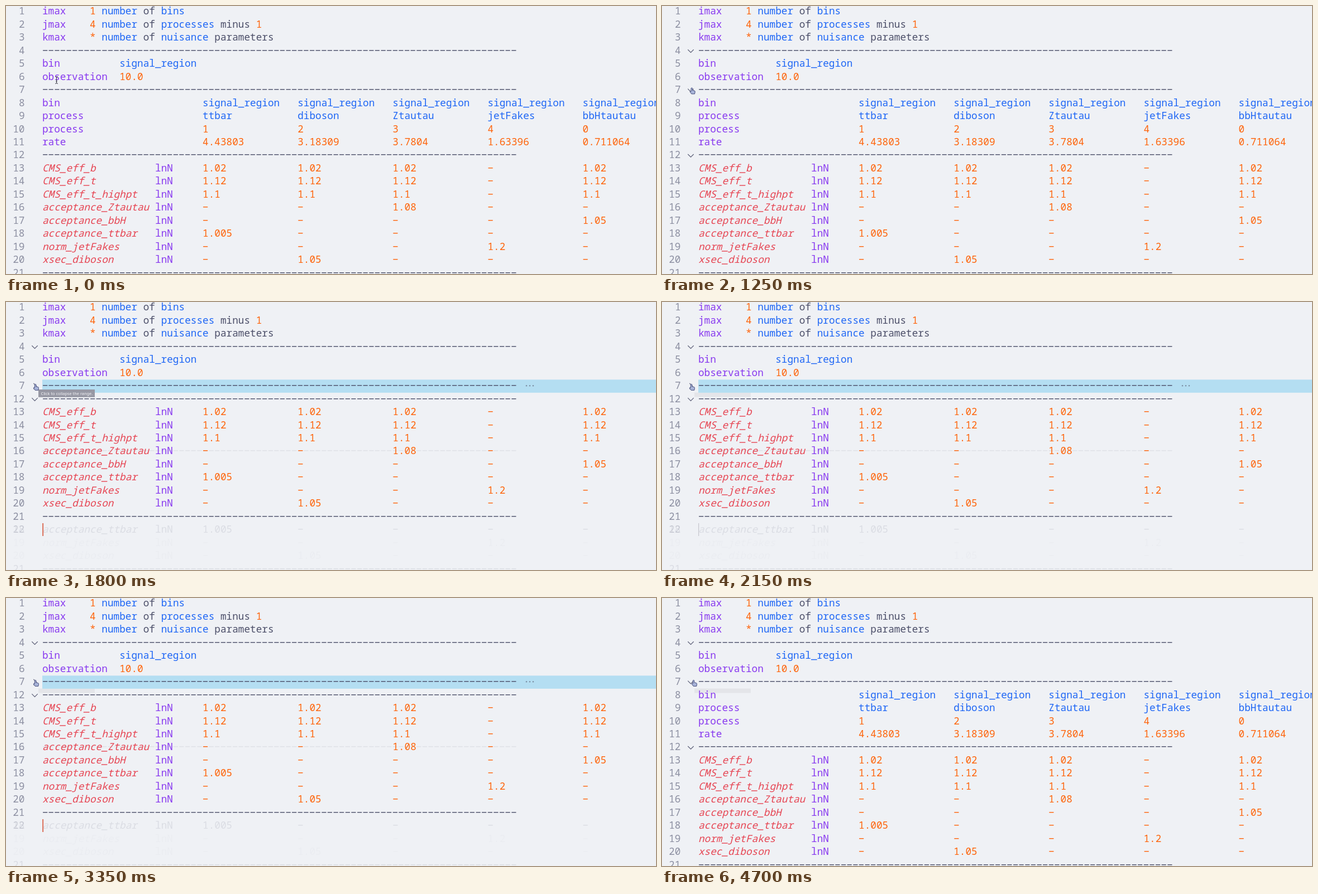
Recreate the animation shown at these times as an HTML page. Size 1164 px wide and 481 px high, loop 4.95 s.

```html
<!DOCTYPE html>
<html lang="en">
<head>
<meta charset="utf-8">
<title>Folding a datacard</title>
<style>
html, body { margin: 0; width: 100%; height: 100%; overflow: hidden; background: #eff1f5; }
svg { display: block; width: 1164px; height: 481px; }
text { font: 17.72px "Noto Sans Mono", "DejaVu Sans Mono", monospace; font-variant-ligatures: none; }
.k { fill: #8839ef; }
.b { fill: #1e66f5; }
.n { fill: #fe640b; }
.t { fill: #4c4f69; }
.p { fill: #e64553; font-style: italic; }
.num { fill: #8c8fa1; }
.line { fill: none; stroke: #5c5f77; stroke-width: 1.2; }
.tip text { font: 7.4px "Noto Sans", "Open Sans", sans-serif; fill: #f4f4f7; }
.ghost text { fill: #4c4f69; }
</style>
</head>
<body>
<svg id="stage" viewBox="0 0 1164 481"></svg>
<script>
(() => {
const LOOP = 4950, X0 = 65, CH = 10.633, LH = 23.47, TOP = -1.5, BASE = 16.8;
const COLS = [27, 43, 59, 75, 91];
const stage = document.getElementById('stage');

function el(parent, tag, attrs = {}, text) {
  const node = document.createElementNS('http://www.w3.org/2000/svg', tag);
  for (const k in attrs) node.setAttribute(k, attrs[k]);
  if (text !== undefined) node.textContent = text;
  return parent.appendChild(node);
}
const group = (parent, cls = '') => el(parent, 'g', { class: cls });
const show = (node, on) => node.setAttribute('visibility', on ? 'visible' : 'hidden');
const rowTop = i => TOP + i * LH;

// A token is [column, class, text].
const values = (cls, list) => list.split(' ').map((v, i) => [COLS[i], cls, v.replace(/^-$/, '−')]);
const rule = () => [[0, 't', '−'.repeat(80)]];
const nuisance = (name, list) => [[0, 'p', name], [19, 'k', 'lnN'], ...values('n', list)];

const rows = [
  [[0, 'k', 'imax'], [8, 'n', '1'], [10, 'b', 'number'], [17, 't', 'of'], [20, 'b', 'bins']],
  [[0, 'k', 'jmax'], [8, 'n', '4'], [10, 'b', 'number'], [17, 't', 'of'], [20, 'b', 'processes'],
   [30, 't', 'minus'], [36, 'n', '1']],
  [[0, 'k', 'kmax'], [8, 'n', '*'], [10, 'b', 'number'], [17, 't', 'of'], [20, 'b', 'nuisance'],
   [29, 't', 'parameters']],
  rule(),
  [[0, 'k', 'bin'], [13, 'b', 'signal_region']],
  [[0, 'k', 'observation'], [13, 'n', '10.0']],
  rule(),
  [[0, 'k', 'bin'], ...values('b', Array(5).fill('signal_region').join(' '))],
  [[0, 'k', 'process'], ...values('b', 'ttbar diboson Ztautau jetFakes bbHtautau')],
  [[0, 'k', 'process'], ...values('n', '1 2 3 4 0')],
  [[0, 'k', 'rate'], ...values('n', '4.43803 3.18309 3.7804 1.63396 0.711064')],
  rule(),
  nuisance('CMS_eff_b', '1.02 1.02 1.02 - 1.02'),
  nuisance('CMS_eff_t', '1.12 1.12 1.12 - 1.12'),
  nuisance('CMS_eff_t_highpt', '1.1 1.1 1.1 - 1.1'),
  nuisance('acceptance_Ztautau', '- - 1.08 - -'),
  nuisance('acceptance_bbH', '- - - - 1.05'),
  nuisance('acceptance_ttbar', '1.005 - - - -'),
  nuisance('norm_jetFakes', '- - - 1.2 -'),
  nuisance('xsec_diboson', '- 1.05 - - -'),
  rule(),
  []
];

function drawRow(parent, i) {
  const g = group(parent), y = rowTop(i) + BASE;
  el(g, 'text', { class: 'num', x: 33.5, y, 'text-anchor': 'end' }, i + 1);
  for (const [col, cls, s] of rows[i]) el(g, 'text', { class: cls, x: X0 + col * CH, y }, s);
  return g;
}

const rowShift = i => `translate(0 ${rowTop(i) + LH / 2})`;

function chevron(parent, i, open = true) {
  const d = open ? 'M46.3 -2.4L51.5 2.8L56.7 -2.4' : 'M49.3 -5.2L54.5 0L49.3 5.2';
  return el(parent, 'path', { class: 'line', d, transform: rowShift(i) });
}

// Faint remains of the unfolded text, seen while folded.
const ghost = group(stage, 'ghost');
for (const [i, opacity] of [[11, .1], [17, .12], [18, .025], [19, .025], [20, .12]])
  drawRow(ghost, i).setAttribute('opacity', opacity);

const stain = el(stage, 'rect', { x: 58, y: 162.5, width: 101, height: 8, fill: '#e4e5e9' });

const band = group(stage);
el(band, 'rect', { x: X0, y: rowTop(6), width: 1164 - X0, height: LH, fill: '#b4def2' });
for (const x of [932, 938, 944]) el(band, 'circle', { cx: x, cy: 150.3, r: 1.2, fill: '#7c8fa3' });

const head = group(stage), inner = group(stage), tail = group(stage);
rows.forEach((_, i) => drawRow(i < 7 ? head : i < 11 ? inner : tail, i));
tail.lastChild.setAttribute('opacity', .3);

const folds = group(stage);
chevron(folds, 3);
const openMark = chevron(folds, 6);
const shutMark = chevron(folds, 6, false);
const tailMark = chevron(folds, 11);

const caretTrace = el(stage, 'rect', { x: 65, y: 397, width: 1.2, height: 23, fill: '#c5c6cd' });
const caret = el(stage, 'rect', { x: 65, y: 397, width: 2.2, height: 23, fill: '#dd7a66' });

const tip = group(stage, 'tip');
el(tip, 'rect', { x: 58, y: 157, width: 101, height: 13.8, fill: '#9798a4' });
el(tip, 'text', { x: 62.5, y: 166.6 }, 'Click to collapse the range.');

const beam = el(stage, 'path', {
  d: 'M-2.4 -6.3Q0 -6.3 0 -4.8Q0 -6.3 2.4 -6.3M0 -4.8V4.8M-2.4 6.3Q0 6.3 0 4.8Q0 6.3 2.4 6.3M-1.3 2H1.3',
  fill: 'none', stroke: '#33343f', 'stroke-width': 1
});
const hand = el(stage, 'path', {
  d: 'M-2.7 -4.3a1.25 1.25 0 0 1 2.5 0V-1.3L3.3 -.5Q4.7 0 4.5 1.5L3.8 5.3H-1.8L-4.6 1.6Q-4.8 .2 -3.4 .4L-2.7 1Z',
  fill: '#a9b5da', stroke: '#434a78', 'stroke-width': 1
});

// Step tables: [start, ...values], each held until the next start.
const pointer = [
  [0, 90.5, 133], [100, 84, 135], [150, 77, 138], [200, 70, 142], [250, 64, 146], [300, 60, 149],
  [350, 58, 150.5], [450, 57, 151], [600, 56.5, 151.5], [650, 56, 152], [700, 55.5, 152],
  [1000, 55, 152], [1250, 54.7, 152.5], [1300, 54.3, 152.7], [1500, 54, 153],
  [4200, 56, 153], [4700, 58, 153]
];
const tipFade = [[0, 0], [1700, 1], [1950, .6], [2050, .3], [2150, 0]];
const blink = [[0, 0], [1800, 1], [1950, 0], [2350, 1], [2800, 0], [3350, 1], [3650, 0]];

function at(table, t) {
  let row = table[0];
  for (const r of table) if (r[0] <= t) row = r;
  return row.slice(1);
}

function draw(t) {
  const folded = t >= 1800 && t < 3650;
  const gutter = t >= 250;
  const [x, y] = at(pointer, t);
  tail.setAttribute('transform', `translate(0 ${folded ? -4 * LH : 0})`);
  tailMark.setAttribute('transform', rowShift(folded ? 7 : 11));
  show(inner, !folded);
  show(band, folded);
  show(ghost, folded);
  show(stain, t >= 1800);
  show(caretTrace, folded);
  show(caret, at(blink, t)[0]);
  show(folds, gutter);
  show(openMark, gutter && !folded);
  show(shutMark, folded);
  tip.setAttribute('opacity', at(tipFade, t)[0]);
  for (const p of [beam, hand]) p.setAttribute('transform', `translate(${x} ${y})`);
  show(beam, !gutter);
  show(hand, gutter);
}

const start = performance.now();
function tick() {
  draw((performance.now() - start) % LOOP);
  requestAnimationFrame(tick);
}
tick();
})();
</script>
</body>
</html>
```
